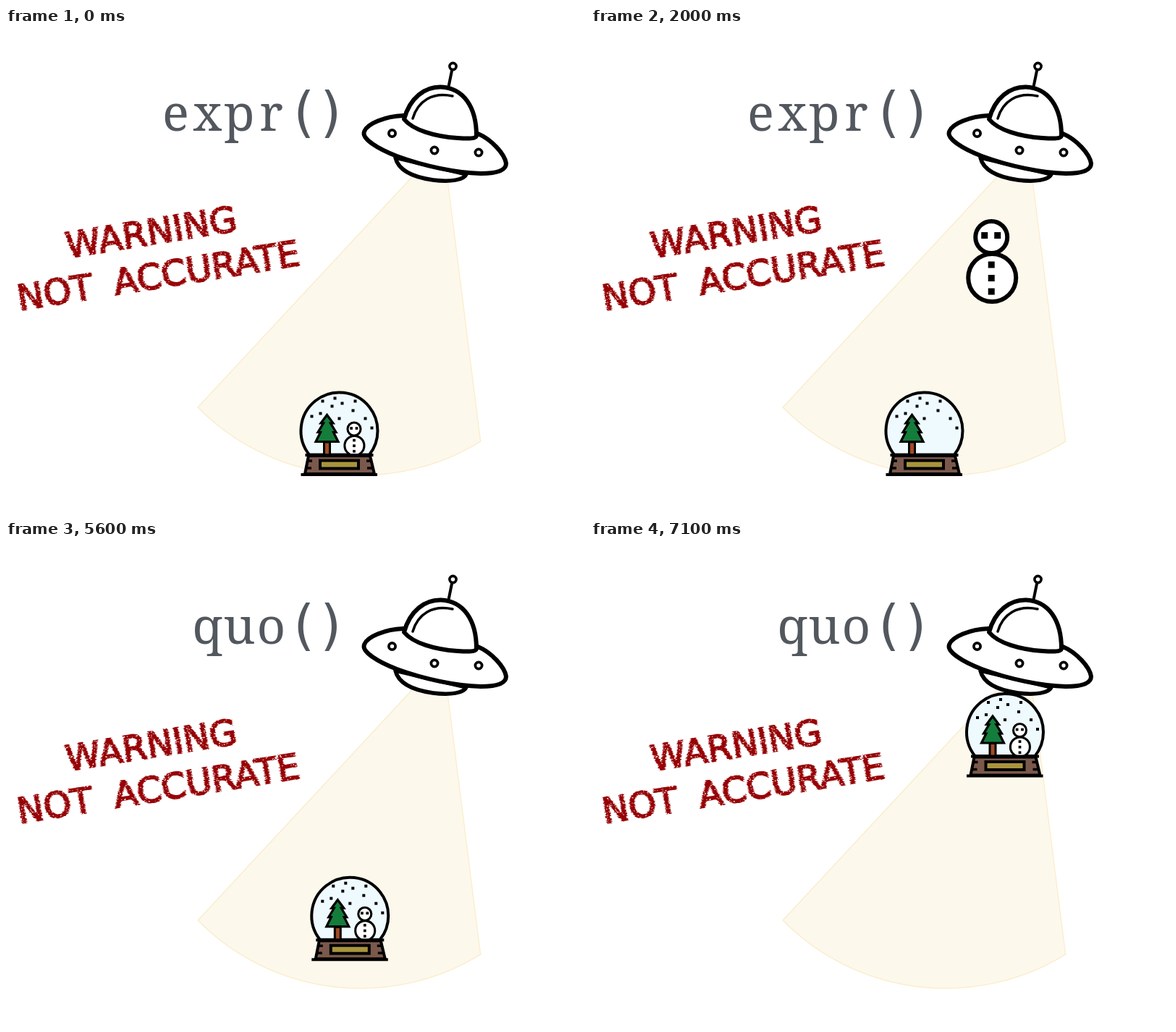
Write an HTML page with a canvas that moves like this. It is 800 by 670 pixels and loops after 8.1 s.

```html
<!DOCTYPE html>
<html lang="en">
<head>
<meta charset="utf-8">
<title>expr() and quo()</title>
<style>
  html, body { margin: 0; width: 800px; height: 670px; overflow: hidden; background: #fff; }
  canvas { display: block; }
</style>
</head>
<body>
<canvas id="stage" width="800" height="670"></canvas>
<script>
const ctx = document.getElementById('stage').getContext('2d');
const LOOP = 8100, TICK = 100, LIFT = 1420;
const SNOWMAN_START = 982, GLOBE_START = 5263;
const SLIDE_FADE = [3600, 4000], GHOST_FADE = [980, 1630];

const progress = (t, from, to) => Math.min(1, Math.max(0, (t - from) / (to - from)));
const ease = u => (1 - Math.cos(Math.PI * u)) / 2;
const lift = (t, start) => ease(progress(t, start, start + LIFT));

function paint(path, fill, stroke, width) {
  if (fill) {
    ctx.fillStyle = fill;
    ctx.fill(path);
  }
  if (stroke) {
    ctx.strokeStyle = stroke;
    ctx.lineWidth = width;
    ctx.stroke(path);
  }
}

function shape(d, fill, width, stroke = '#000') {
  paint(new Path2D(d), fill, stroke, width);
}

function circle(x, y, r, fill, width) {
  const path = new Path2D();
  path.arc(x, y, r, 0, Math.PI * 2);
  paint(path, fill, '#000', width);
}

function dot(x, y, size) {
  ctx.fillStyle = '#000';
  ctx.fillRect(x - size / 2, y - size / 2, size, size);
}

// Draws with its own origin, scale and opacity.
function placed(x, y, scale, alpha, draw) {
  if (alpha <= 0) return;
  ctx.save();
  ctx.globalAlpha = alpha;
  ctx.translate(x, y);
  ctx.scale(scale, scale);
  draw();
  ctx.restore();
}

function drawBeam() {
  const path = new Path2D();
  path.moveTo(572, 194);
  path.lineTo(608, 194);
  path.lineTo(655.5, 570);
  path.arc(490, 302, 316, Math.atan2(268, 165.5), Math.atan2(222, -225));
  path.closePath();
  paint(path, '#fdf8ec', '#fbedcb', 1.3);
}

function drawSaucer() {
  ctx.lineCap = ctx.lineJoin = 'round';
  shape('M538 179C542 196 562 206 590 210C614 213 633 210 636 202Z', '#fff', 5.5);
  shape('M549 121C524 122 499 132 495 143C491 153 514 167 540 177C578 191 622 200 656 201' +
        'C680 201 691 196 691 187C689 174 671 154 652 146Z', '#fff', 6);
  shape('M550 126C558 96 579 81 601 81.500C632 83 650 109 650 149C649 153 640 153 624 152' +
        'C593 150 562 141 550 126Z', '#fff', 6);
  shape('M562 125C569 101 589 88 617 94', null, 3.5);
  shape('M616 59L611.500 81', null, 4);
  circle(617.5, 53, 4.6, '#fff', 3.6);
  for (const [x, y] of [[533.5, 145.5], [592, 169], [653, 172]]) circle(x, y, 4.6, '#fff', 3.8);
  ctx.lineCap = 'butt';
  ctx.lineJoin = 'miter';
}

// Origin is the centre of the head.
function drawSnowman(line) {
  circle(1, 56, 33, '#fff', line);
  circle(0, 0, 22, '#fff', line);
  for (const x of [-9.5, 8.5]) dot(x, -2.5, 9);
  for (const y of [38, 56.5, 75]) dot(0, y, 9);
}

const SNOW = [[437, 515], [454, 511], [464, 518], [482, 515], [450, 522], [479, 528],
              [434, 532], [422, 536], [460, 539], [496, 539], [505, 552]];

function drawGlobe(snowmanAlpha) {
  const glass = new Path2D();
  glass.arc(460.5, 556.5, 53, 2.47, 0.67);
  glass.closePath();
  paint(glass, '#effaff', '#000', 4);
  for (const [x, y] of SNOW) dot(x + 0.5, y + 0.5, 4);
  shape('M439.500 572H447.500V590H439.500Z', '#a24b26', 3);
  shape('M443.500 534.500L452 546H448.500L456 558.500H452.500L459 571.500H428L434.500 558.500' +
        'H431L438.500 546H435Z', '#147d3c', 3.2);
  placed(481, 554, 0.41, snowmanAlpha, () => drawSnowman(7.5));
  shape('M418 591H503L509 616H413Z', '#7a594c', 4);
  shape('M416 598H423M415 608H422M498 598H505M499 608H506', null, 3.5);
  shape('M434 597.500H487V608.500H434Z', '#a9943d', 4);
  shape('M413.500 590H507.500M407.500 617H513', null, 4);
}

const SERIF = '69px "Noto Serif", serif';
const MONO = '74px "DejaVu Sans Mono", monospace';

function drawLetters(text, font, x, pitch, alpha) {
  ctx.save();
  ctx.globalAlpha = alpha;
  ctx.fillStyle = '#53585f';
  ctx.font = font;
  ctx.textAlign = 'center';
  [...text].forEach((letter, i) => ctx.fillText(letter, x + pitch * i, 142));
  ctx.restore();
}

function seeded(seed) {
  return () => (seed = (seed * 16807) % 2147483647) / 2147483647;
}

function makeLayer() {
  const layer = document.createElement('canvas');
  layer.width = 440;
  layer.height = 420;
  return layer;
}

// Red chalk lettering, prepared once: ragged row by row, then speckled.
function makeWarning() {
  const clean = makeLayer(), chalk = makeLayer();
  const pen = clean.getContext('2d'), c = chalk.getContext('2d');
  const random = seeded(71);
  pen.font = '49px "DejaVu Sans", sans-serif';
  pen.textAlign = 'center';
  pen.wordSpacing = '14px';
  pen.fillStyle = pen.strokeStyle = '#970306';
  pen.lineWidth = 1.8;
  for (const [text, x, y] of [['WARNING', 203, 299], ['NOT ACCURATE', 213, 359]]) {
    pen.save();
    pen.translate(x, y);
    pen.rotate(-0.16);
    pen.fillText(text, 0, 0);
    pen.strokeText(text, 0, 0);
    pen.restore();
  }
  for (let y = 235; y < 400; y++) {
    c.drawImage(clean, 0, y, 440, 1, random() * 2.4 - 1.2, y, 440, 1);
  }
  c.globalCompositeOperation = 'destination-out';
  for (let i = 0; i < 3600; i++) {
    c.fillRect(random() * 440, 235 + random() * 165, 0.6 + random() * 1.2, 0.5 + random());
  }
  return chalk;
}

const warning = makeWarning();

function render(t) {
  const swap = progress(t, ...SLIDE_FADE);
  const rise = lift(t, SNOWMAN_START);
  const globe = lift(t, GLOBE_START);
  const ghost = Math.max(1 - progress(t, ...GHOST_FADE), swap);

  ctx.fillStyle = '#fff';
  ctx.fillRect(0, 0, 800, 670);
  drawBeam();
  drawSaucer();
  drawLetters('expr', SERIF, 234.5, 44, 1 - swap);
  drawLetters('quo', SERIF, 278.5, 44, swap);
  drawLetters('()', MONO, 410.5, 39.5, 1);
  ctx.drawImage(warning, 0, 0);
  placed(459.5 + 115 * rise, 527 - 292 * rise, 1, 1 - swap, () => drawSnowman(6));
  placed(111.5 * globe, -292.5 * globe, 1, 1, () => drawGlobe(ghost));
}

const start = performance.now();
function frame() {
  const t = (performance.now() - start) % LOOP;
  render(Math.floor(t / TICK) * TICK);
  requestAnimationFrame(frame);
}
frame();
</script>
</body>
</html>
```
